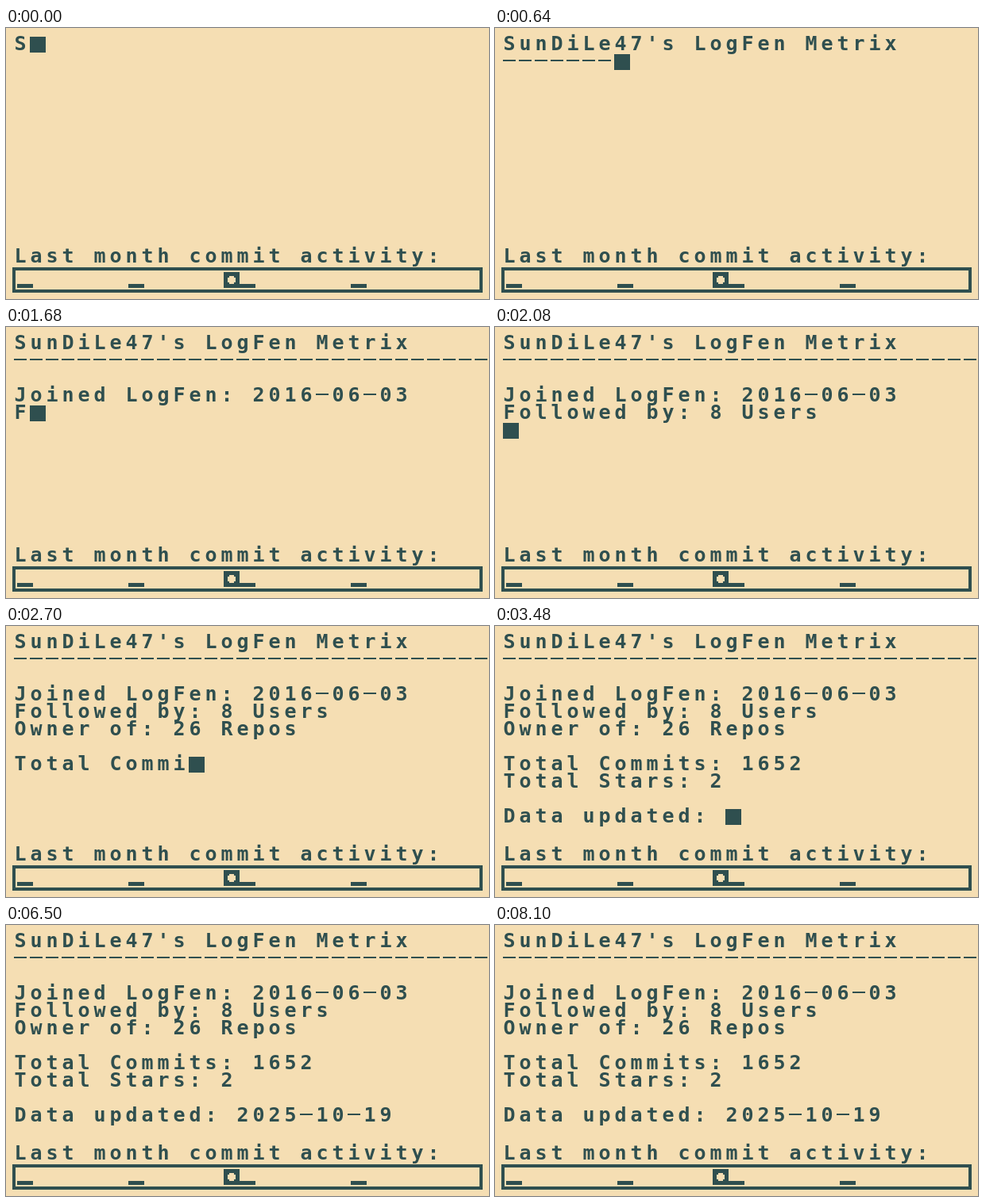
These frames come from a looping animation (608 by 342 pixels, 8.5 s). An HTML page with a canvas:

```html
<!DOCTYPE html>
<html lang="en">
<head>
<meta charset="utf-8">
<title>Metrix</title>
<style>
  html, body { margin: 0; width: 100%; height: 100%; overflow: hidden; background: #f5deb3; }
  canvas { display: block; }
</style>
</head>
<body>
<canvas id="stage" width="608" height="342"></canvas>
<script>
const PAPER = '#f5deb3', INK = '#2f4f4f';
const LOOP = 8500, KEY_MS = 20, BLINK_START = 4100, BLINK_MS = 400;
const LEFT = 10, COL = 20, ROW = 22, GLYPH = 16;

const text = [
  "SunDiLe47's LogFen Metrix",
  '-'.repeat(30),
  '',
  'Joined LogFen: 2016-06-03',
  'Followed by: 8 Users',
  'Owner of: 26 Repos',
  '',
  'Total Commits: 1652',
  'Total Stars: 2',
  '',
  'Data updated: 2025-10-19'
].join('\n');

const ctx = document.getElementById('stage').getContext('2d');

function rect(x, y, w, h, color = INK) {
  ctx.fillStyle = color;
  ctx.fillRect(x, y, w, h);
}

// One character per fixed cell; hyphens fill the glyph width.
function drawLine(line, baseline) {
  ctx.fillStyle = INK;
  [...line].forEach((ch, i) => {
    const x = LEFT + i * COL;
    if (ch === '-') rect(x, baseline - 10, GLYPH, 2);
    else ctx.fillText(ch, x + GLYPH / 2, baseline);
  });
}

function drawActivity() {
  drawLine('Last month commit activity:', 296);
  ctx.strokeStyle = INK;
  ctx.lineWidth = 4;
  ctx.strokeRect(10, 304, 588, 28);
  for (const day of [0, 7, 14, 21]) rect(14 + day * COL, 323, COL, 5);
  rect(274, 308, COL, 20);
  rect(279, 315, 10, 6, PAPER);
  rect(281, 313, 6, 10, PAPER);
}

function draw(t) {
  rect(0, 0, 608, 342, PAPER);
  ctx.font = 'bold 25px "DejaVu Sans Mono", monospace';
  ctx.textAlign = 'center';

  const lines = text.slice(0, Math.floor(t / KEY_MS) + 1).split('\n');
  lines.forEach((line, r) => drawLine(line, 28 + r * ROW));

  const hidden = t >= BLINK_START && Math.floor((t - BLINK_START) / BLINK_MS) % 2 === 0;
  if (!hidden) {
    const row = lines.length - 1;
    rect(LEFT + lines[row].length * COL, 11 + row * ROW, COL, 20);
  }
  drawActivity();
}

// The bar at day 14 is tall; the low one sits right beside it.
const baseActivity = drawActivity;
drawActivity = function () {
  baseActivity();
  rect(294, 323, COL, 5);
};

const start = performance.now();
function tick() {
  draw((performance.now() - start) % LOOP);
  requestAnimationFrame(tick);
}
tick();
</script>
</body>
</html>
```
